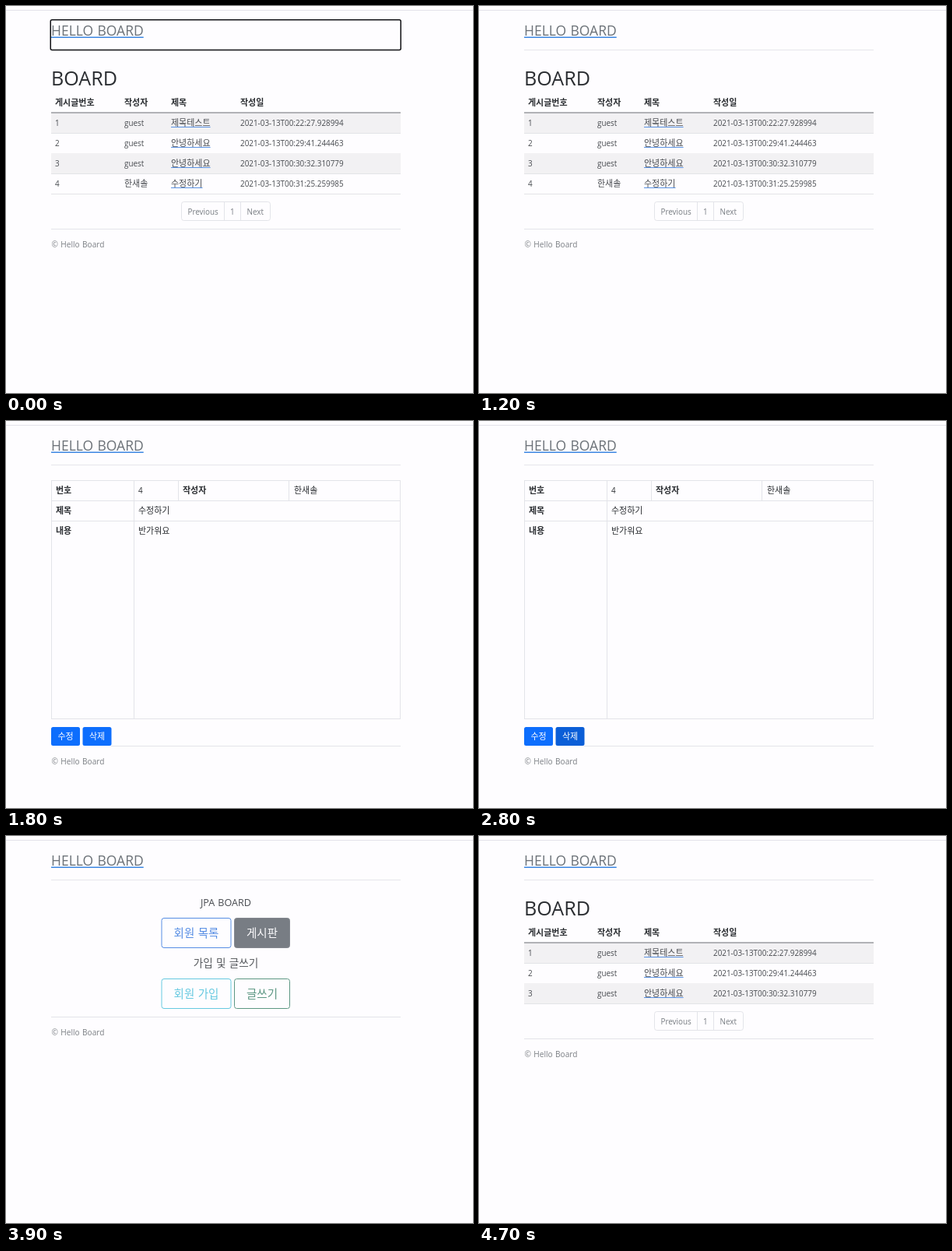
These frames come from a looping animation (600 by 497 pixels, 5.1 s). An HTML page with a canvas:

```html
<!DOCTYPE html>
<html lang="ko">
<head>
<meta charset="utf-8">
<title>Hello Board</title>
<style>
  html, body { margin: 0; width: 100%; height: 100%; overflow: hidden; background: #fefdff; }
  canvas { display: block; width: 600px; height: 497px; }
</style>
</head>
<body>
<canvas id="stage"></canvas>
<script>
const W = 600, H = 497, LOOP = 5100, STEP = 100;
const INK = '#2a2d31', SOFT = '#484b50', GRAY = '#777c82', RULE = '#e3e4e9', BLUE = '#0d6efd';
const HOVER_BLUE = [11, 94, 215];
const FONTS = '"Open Sans", "Noto Sans CJK KR", "Noto Sans CJK", sans-serif';

const canvas = document.getElementById('stage');
const ctx = canvas.getContext('2d');
const dpr = window.devicePixelRatio || 1;
canvas.width = W * dpr;
canvas.height = H * dpr;

const posts = [
  ['1', 'guest', '제목테스트', '2021-03-13T00:22:27.928994'],
  ['2', 'guest', '안녕하세요', '2021-03-13T00:29:41.244463'],
  ['3', 'guest', '안녕하세요', '2021-03-13T00:30:32.310779'],
  ['4', '한새솔', '수정하기', '2021-03-13T00:31:25.259985']
];
const columns = [63, 152, 212, 301];

// Hangul is set slightly larger than Latin at body size.
function text(str, x, y, { size, color = INK, bold = false, align = 'left' } = {}) {
  const px = size || (/[가-힣]/.test(str) ? 11 : 9.9);
  ctx.font = `${bold ? 'bold ' : ''}${px}px ${FONTS}`;
  ctx.wordSpacing = '0.8px';
  ctx.fillStyle = color;
  ctx.textAlign = align;
  ctx.fillText(str, x, y);
  return ctx.measureText(str).width;
}

function rect(x, y, w, h, color) {
  ctx.fillStyle = color;
  ctx.fillRect(x, y, w, h);
}

const hline = (x1, x2, y, color = RULE) => rect(x1, y, x2 - x1, 1, color);
const vline = (x, y1, y2, color = RULE) => rect(x, y1, 1, y2 - y1, color);

function box(x, y, w, h, r, { fill, stroke, line = 1 }) {
  ctx.beginPath();
  ctx.roundRect(x, y, w, h, r);
  if (fill) {
    ctx.fillStyle = fill;
    ctx.fill();
  }
  if (stroke) {
    ctx.strokeStyle = stroke;
    ctx.lineWidth = line;
    ctx.stroke();
  }
}

const mix = (a, b, k) => `rgb(${a.map((v, i) => Math.round(v + (b[i] - v) * k))})`;

function hover(t, start) {
  const k = Math.min(1, Math.max(0, (t - start) / 150));
  return k * k * (3 - 2 * k);
}

function header() {
  hline(0, W, 5, '#e3e2ea');
  const w = text('HELLO BOARD', 58, 38, { size: 17.5, color: '#6c7278' });
  rect(58, 39.5, w, 1.5, '#3b86e2');
  hline(58, 507, 56, '#e6e6eb');
}

function footer(y, x = 58) {
  hline(x, 507, y);
  text('© Hello Board', 58.5, y + 24, { size: 10.1, color: '#7b7f84' });
}

function listPage(count) {
  text('BOARD', 58, 101.5, { size: 25.1 });
  ['게시글번호', '작성자', '제목', '작성일'].forEach((s, i) =>
    text(s, columns[i], 128, { bold: true }));

  posts.slice(0, count).forEach((row, n) => {
    const y = 137 + n * 26;
    if (n % 2 === 0) rect(58, y, 449, 26, '#f2f1f3');
    hline(58, 507, y + 26, '#e3e4e7');
    row.forEach((s, i) => {
      const w = text(s, columns[i], y + 16.75, { color: SOFT });
      if (i === 2) rect(columns[i], y + 18, w, 1, '#5a92e2');
    });
  });
  hline(58, 507, 136.5, '#6d6f74');

  const top = 147.5 + count * 26;
  box(225.5, top, 114, 24, 3, { stroke: RULE });
  vline(280, top, top + 24);
  vline(301, top, top + 24);
  text('Previous', 233.5, top + 16.5, { color: GRAY });
  text('1', 288, top + 16.5, { color: GRAY });
  text('Next', 309.5, top + 16.5, { color: GRAY });
  footer(182 + count * 26);
}

function postPage(t) {
  [76, 102, 128, 382].forEach(y => hline(58, 507, y));
  [58, 164, 506].forEach(x => vline(x, 76, 383));
  vline(221, 76, 102);
  vline(363, 76, 102);

  text('번호', 64, 93, { bold: true });
  text('4', 170, 93);
  text('작성자', 227, 93, { bold: true });
  text('한새솔', 370, 93);
  text('제목', 64, 119, { bold: true });
  text('수정하기', 170, 119);
  text('내용', 64, 145, { bold: true });
  text('반가워요', 170, 145);

  footer(417, 135);
  box(58, 393, 37, 24, 2.5, { fill: BLUE });
  box(98.5, 393, 37, 24, 2.5, { fill: mix([13, 110, 253], HOVER_BLUE, hover(t, 2250)) });
  text('수정', 76.5, 409, { color: '#fff', align: 'center' });
  text('삭제', 117, 409, { color: '#fff', align: 'center' });
}

function outlineButton(label, x, y, w, color, { fill, ink = color } = {}) {
  box(x + .5, y + .5, w - 1, 38, 3, { stroke: color, fill });
  text(label, x + w / 2, y + 25, { size: 14.5, color: ink, align: 'center' });
}

function homePage(t) {
  const k = hover(t, 3450);
  const gray = [120, 125, 132], paper = [254, 253, 255];
  text('JPA BOARD', 282.5, 90, { size: 12.6, color: SOFT, align: 'center' });
  outlineButton('회원 목록', 199.5, 105, 90, '#568de4');
  outlineButton('게시판', 293, 105, 72, '#83878e',
    { fill: mix(paper, gray, k), ink: mix(gray, paper, k) });
  text('가입 및 글쓰기', 282.5, 168.3, { size: 13.6, color: '#55585c', align: 'center' });
  outlineButton('회원 가입', 199.5, 183, 90, '#66c9e0');
  outlineButton('글쓰기', 293, 183, 72, '#5c9783');
  footer(232);
}

function draw(now) {
  const t = Math.floor((now % LOOP) / STEP) * STEP;
  ctx.setTransform(dpr, 0, 0, dpr, 0, 0);
  rect(0, 0, W, H, '#fefdff');
  header();
  if (t < 1400) listPage(4);
  else if (t < 2900) postPage(t);
  else if (t < 4100) homePage(t);
  else listPage(3);
  if (t < 1200) box(57.25, 17.75, 450, 38.75, 2, { stroke: '#101014', line: 1.5 });
}

let start;
function tick(now) {
  if (start === undefined) start = now;
  draw(now - start);
  requestAnimationFrame(tick);
}
draw(0);
requestAnimationFrame(tick);
</script>
</body>
</html>
```
